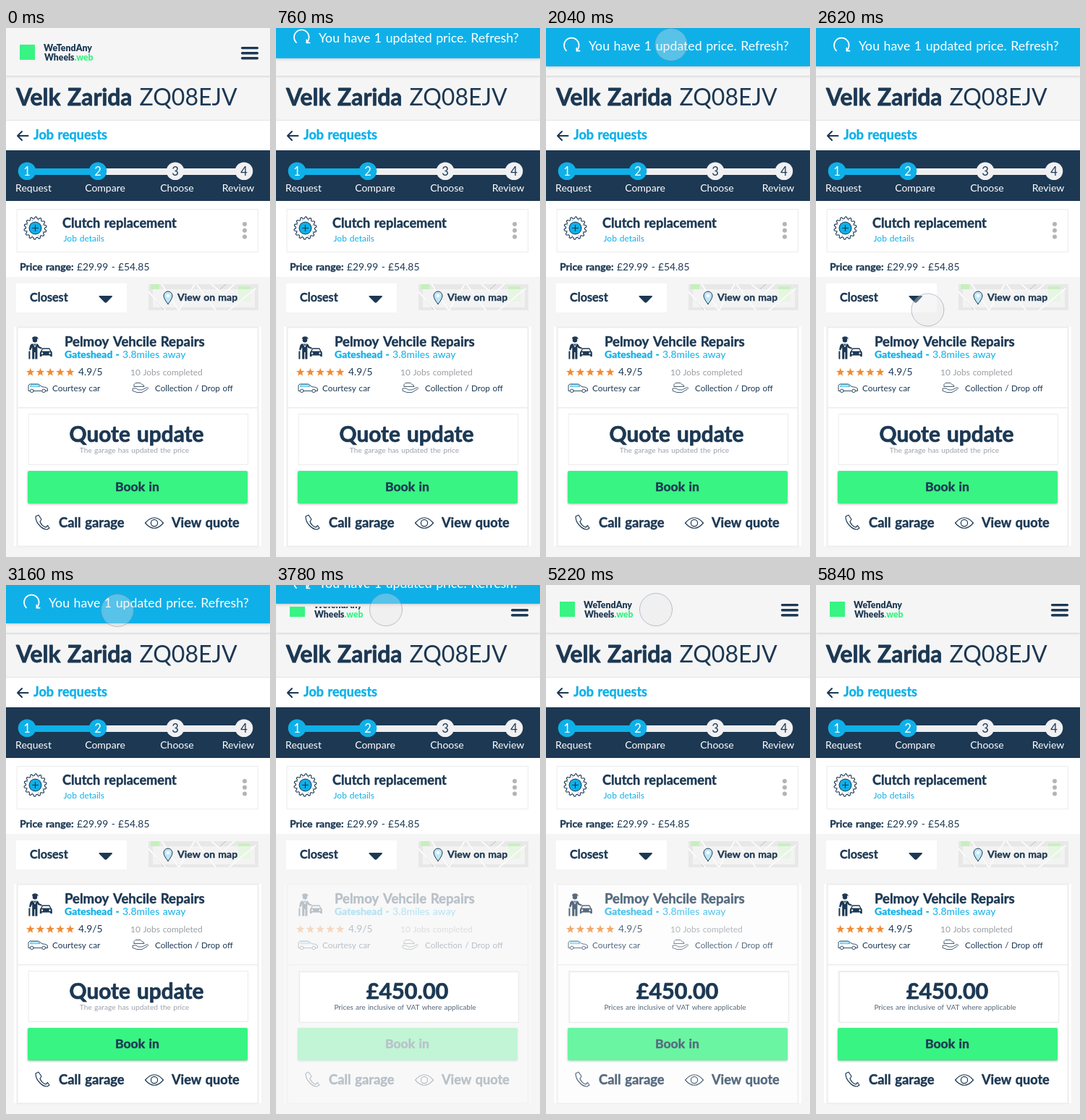
Write an HTML page with a canvas that moves like this. It is 365 by 731 pixels and loops after 6960 ms.

```html
<!DOCTYPE html>
<html lang="en">
<head>
<meta charset="utf-8">
<title>Updated price</title>
<style>
html, body { margin: 0; width: 100%; height: 100%; overflow: hidden; background: #f5f5f5; }
canvas { display: block; width: 365px; height: 731px; }
</style>
</head>
<body>
<canvas id="stage"></canvas>
<script>
const W = 365, H = 731, LOOP = 6960;
const NAVY = '#1c3853', CYAN = '#0fb0e8', GREEN = '#38f483', PAGE = '#f5f5f5', LINE = '#ebebeb';
const canvas = document.getElementById('stage');
const c = canvas.getContext('2d');
const dpr = window.devicePixelRatio || 1;
canvas.width = Math.round(W * dpr);
canvas.height = Math.round(H * dpr);

const clamp = v => Math.max(0, Math.min(1, v));
const span = (t, start, end) => clamp((t - start) / (end - start));
const lerp = (a, b, p) => a + (b - a) * p;
const outQuart = p => 1 - (1 - p) ** 4;
const outSine = p => Math.sin(p * Math.PI / 2);
const inOut = p => p < .5 ? 2 * p * p : 1 - 2 * (1 - p) ** 2;

function text(str, x, y, size, { weight = 400, color = NAVY, align = 'left' } = {}) {
  c.font = `${weight} ${size}px Lato, "Open Sans", sans-serif`;
  c.wordSpacing = size * .06 + 'px';
  c.textAlign = align;
  c.fillStyle = color;
  c.fillText(str, x, y);
  if (weight === 700) {
    // Slightly heavier than the installed bold
    c.strokeStyle = color;
    c.lineWidth = size * .024;
    c.lineJoin = 'round';
    c.strokeText(str, x, y);
  }
  return c.measureText(str).width;
}
const bold = (str, x, y, size, opts) => text(str, x, y, size, { weight: 700, ...opts });

function rect(x, y, w, h, fill) {
  c.fillStyle = fill;
  c.fillRect(x, y, w, h);
}

function box(x, y, w, h, border = LINE, width = 1) {
  rect(x, y, w, h, '#fff');
  c.strokeStyle = border;
  c.lineWidth = width;
  c.strokeRect(x + .5, y + .5, w - 1, h - 1);
}

function disc(x, y, r, fill) {
  c.beginPath();
  c.arc(x, y, r, 0, Math.PI * 2);
  c.fillStyle = fill;
  c.fill();
}

function stroke(d, color = NAVY, width = 1) {
  c.strokeStyle = color;
  c.lineWidth = width;
  c.lineCap = c.lineJoin = 'round';
  c.stroke(new Path2D(d));
}

function fill(d, color = NAVY) {
  c.fillStyle = color;
  c.fill(new Path2D(d));
}

function shadow(color, blur, y) {
  c.shadowColor = color;
  c.shadowBlur = blur * dpr;
  c.shadowOffsetY = y * dpr;
}
const noShadow = () => shadow('transparent', 0, 0);

function polar(n, cx, cy, radius) {
  c.beginPath();
  for (let i = 0; i < n; i++) {
    const a = i / n * Math.PI * 2 - Math.PI / 2, r = radius(i);
    c.lineTo(cx + r * Math.cos(a), cy + r * Math.sin(a));
  }
  c.closePath();
}

function header() {
  shadow('rgba(0,0,0,.16)', 3, 1);
  rect(0, 0, W, 66, PAGE);
  noShadow();
  rect(19, 23, 21, 21, GREEN);
  text('WeTendAny', 52, 32, 12.4, { weight: 900 });
  const w = text('Wheels', 53, 44.5, 12.2, { weight: 900 });
  text('.web', 53 + w, 44.5, 12.2, { weight: 900, color: GREEN });
  for (const y of [27.6, 34.7, 41.8]) stroke(`M326.6 ${y}H347.4`, NAVY, 3.4);
}

function title() {
  bold('Velk Zarida', 14, 106.5, 31.8);
  text('ZQ08EJV', 184.5, 106.5, 32);
  rect(0, 127, W, 42, '#fff');
  rect(0, 127, W, 1, '#e4e4e4');
  stroke('M30.5 149H16M22 143L16 149L22 155', NAVY, 2);
  bold('Job requests', 38, 154, 18, { color: CYAN });
}

function steps() {
  rect(0, 169, W, 70, NAVY);
  rect(29, 194, 98, 9, CYAN);
  rect(127, 194, 202, 9, '#efeff1');
  const labels = ['Request', 'Compare', 'Choose', 'Review'];
  const dots = [29, 127, 234, 329], mids = [38, 137, 236.5, 321];
  labels.forEach((label, i) => {
    const done = i < 2;
    disc(dots[i], 197.8, 12.3, done ? CYAN : '#f1f1f3');
    text(i + 1, dots[i], 203.6, 16.5, { color: done ? '#fff' : NAVY, align: 'center' });
    text(label, mids[i], 226, 14, { color: '#fff', align: 'center' });
  });
}

function gear(x, y) {
  polar(56, x, y, i => i % 4 < 2 ? 15.6 : 13);
  c.strokeStyle = NAVY;
  c.lineWidth = 1.1;
  c.stroke();
  disc(x, y, 9, NAVY);
  disc(x, y, 8, CYAN);
  stroke(`M${x - 4} ${y}h8M${x} ${y - 4}v8`, NAVY, 1.2);
  for (let i = 0; i < 8; i++) {
    const a = i * Math.PI / 4 + .4;
    disc(x + 11.3 * Math.cos(a), y + 11.3 * Math.sin(a), .5, NAVY);
  }
}

function job() {
  rect(0, 239, W, 105, '#fff');
  box(15, 250, 334, 60);
  gear(40.5, 276.5);
  bold('Clutch replacement', 78, 276, 18.1);
  text('Job details', 79.5, 295, 12, { color: CYAN });
  for (const y of [271, 279.8, 288.6]) disc(330, y, 3, '#b4b4b6');
  bold('Price range:', 19, 335, 14.1);
  text('£29.99 - £54.85', 98, 335, 13.8);
}

function filters() {
  rect(14, 353, 153, 40, '#fff');
  bold('Closest', 33, 378, 16.1);
  fill('M129.5 370H146Q148 370 146.6 371.6L139.4 379Q137.8 380.4 136.2 379L128.8 371.6Q127.5 370 129.5 370Z');

  c.save();
  c.beginPath();
  c.rect(197, 354, 152, 36);
  c.clip();
  rect(197, 354, 152, 36, '#e8e8e9');
  rect(200, 354, 12, 7, '#c6efbc');
  rect(321, 357, 17, 21, '#c9f0bf');
  stroke('M195 362L222 392M214 352L240 392M238 392L262 352L290 390M284 354L300 368L318 352M306 392L345 360', '#fff', 1.6);
  stroke('M208 377L218 389M296 361L304 354', '#a9a9ab', .7);
  rect(203, 361, 141, 25, 'rgba(250,250,250,.62)');
  c.restore();
  const pin = 'M224 381.5Q218 374 218 370A6 6 0 0 1 230 370Q230 374 224 381.5Z';
  fill(pin, '#bfe6f6');
  stroke(pin);
  disc(224, 370, 2.3, '#fff');
  bold('View on map', 237, 377, 14);
}

function mechanic() {
  disc(40, 431.2, 3.2, NAVY);
  fill('M36 429Q36.4 426.2 40 426.2Q43.6 426.2 44 428.6L45.6 429.6H36Z');
  fill('M35 436.5H43.5Q45 437 46 440L50 442L49.2 443.6L44.4 442L43.4 440V457.5H40.4V448H39.2V457.5H36.2V441L34 445.5L32 444.6L33.4 438.5Z');
  stroke('M38.4 437L40 441L41.6 437', '#fff', .8);
  rect(31.4, 446.5, 2, 11, NAVY);
  stroke('M48.5 447L50.6 443H60L62 447', NAVY, 1.3);
  fill('M46.8 454V449Q46.8 446.6 49 446.6H61.5Q63.8 446.6 63.8 449V454H61.2V452.4H49.4V454Z');
  disc(50, 449.5, 1.2, '#fff');
  disc(60.6, 449.5, 1.2, '#fff');
}

function garage() {
  mechanic();
  bold('Pelmoy Vehcile Repairs', 81, 440, 18.6);
  const w = bold('Gateshead - ', 81, 456, 14, { color: CYAN });
  text('3.8miles away', 81 + w, 456, 14, { color: CYAN });
  for (let i = 0; i < 5; i++) {
    polar(10, 33.7 + i * 13.75, 475.8, k => k % 2 ? 2.5 : 6);
    c.fillStyle = '#f08b35';
    c.fill();
  }
  text('4.9/5', 100, 480, 13.8);
  text('10 Jobs completed', 172, 480, 11.9, { color: '#9a9da3' });

  stroke('M33 501.5H31V494L33 492H44.5L50 495.8Q57.5 496.4 57.5 499V501.5H55M38.5 501.5H49.5', NAVY, .9);
  stroke('M34 495.6H47L43.8 493.2H35Z', CYAN, .9);
  for (const x of [35.8, 52.2]) {
    c.beginPath();
    c.arc(x, 501.4, 2.3, 0, 7);
    c.strokeStyle = NAVY;
    c.stroke();
  }
  text('Courtesy car', 64, 502, 11.8);
  stroke('M177 495V492.5L179 490.5H186L188.5 493Q191 493 191 495.5H177M175.5 498H180L183 500H188L195.5 496.5Q198 497.5 195 499.5L188 503.5H181L175.5 501.5Z', NAVY, .8);
  text('Collection / Drop off', 206, 502, 11.6);
}

function actions() {
  shadow('rgba(0,0,0,.3)', 3, 1);
  c.beginPath();
  c.roundRect(30, 612, 304, 45, 2);
  c.fillStyle = GREEN;
  c.fill();
  noShadow();
  bold('Book in', 151, 640, 17.6);
  stroke('M41 675L45 673L49 679L47 682Q49 688 55 690L57.5 687.5L60 691L57 693Q51 693 46 687Q41 682 41 675Z', NAVY, 1.2);
  bold('Call garage', 73, 689.5, 18.4);
  stroke('M192.5 684Q205 669.5 217.5 684Q205 698.5 192.5 684Z', NAVY, 1.2);
  c.beginPath();
  c.arc(205, 684, 4.6, 0, 7);
  c.stroke();
  bold('View quote', 229, 689.5, 18.1);
}

function card(alpha, price) {
  rect(11, 413, 342, 303, '#fff');
  box(15, 413, 334, 304, '#ededed', 2);
  rect(16, 524, 332, 1.5, '#ececec');
  garage();
  box(31, 533, 304, 71);
  if (price < 1) {
    bold('Quote update', 180.5, 571.5, 29.8, { align: 'center' });
    text('The garage has updated the price', 177.5, 587, 10.2, { color: '#9ca2ab', align: 'center' });
  }
  actions();
  if (alpha < 1) {
    c.globalAlpha = 1 - alpha;
    rect(10, 411, 344, 308, PAGE);
  }
  c.globalAlpha = price;
  if (price > 0) {
    box(32, 534, 304, 71, '#ededed', 1.5);
    bold('£450.00', 181.5, 572, 30.6, { align: 'center' });
    text('Prices are inclusive of VAT where applicable', 178.5, 587, 10.05, { color: '#56677b', align: 'center' });
  }
  c.globalAlpha = 1;
}

function toast(p) {
  if (p <= 0) return;
  c.save();
  c.translate(0, -57 * (1 - p));
  // A page-coloured strip under the bar hides the header behind it
  rect(0, 52, W, 5, PAGE);
  shadow('rgba(0,0,0,.2)', 4, 1);
  rect(0, -8, W, 61, CYAN);
  noShadow();
  c.beginPath();
  c.arc(35.3, 24, 10.3, Math.PI * .75, Math.PI * 2.25);
  c.strokeStyle = '#fff';
  c.lineWidth = 1.7;
  c.stroke();
  stroke('M42.4 27.5V31.6H46.6', '#fff', 1.7);
  text('You have 1 updated price. Refresh?', 59, 31, 17.7, { color: '#fff' });
  c.restore();
}

// Touch pointer: [start, end, x, y] eased moves
const moves = [
  [1300, 1560, 173, 23],
  [2040, 2260, 202, 540],
  [2540, 2740, 57, 81],
  [2880, 3140, 154, 35],
  [3240, 3500, 152, 34],
  [5440, 5700, 152, -26]
];

function pointer(t) {
  let x = 173, y = -26;
  for (const [start, end, toX, toY] of moves) {
    const p = inOut(span(t, start, end));
    x = lerp(x, toX, p);
    y = lerp(y, toY, p);
  }
  if (y < -24) return;
  disc(x, y, 22.5, 'rgba(228,229,232,.34)');
  c.strokeStyle = 'rgba(110,130,148,.45)';
  c.lineWidth = 1;
  c.stroke();
}

function draw(t) {
  c.setTransform(dpr, 0, 0, dpr, 0, 0);
  rect(0, 0, W, H, PAGE);
  header();
  title();
  steps();
  job();
  filters();

  const dim = inOut(span(t, 3260, 3560)) - outSine(span(t, 4740, 5840));
  card(1 - .72 * dim, span(t, 3560, 3740));
  toast(outQuart(span(t, 360, 1560)) - inOut(span(t, 3503, 4073)));
  pointer(t);
}

const began = performance.now();
function tick() {
  draw((performance.now() - began) % LOOP);
  requestAnimationFrame(tick);
}
tick();
</script>
</body>
</html>
```
